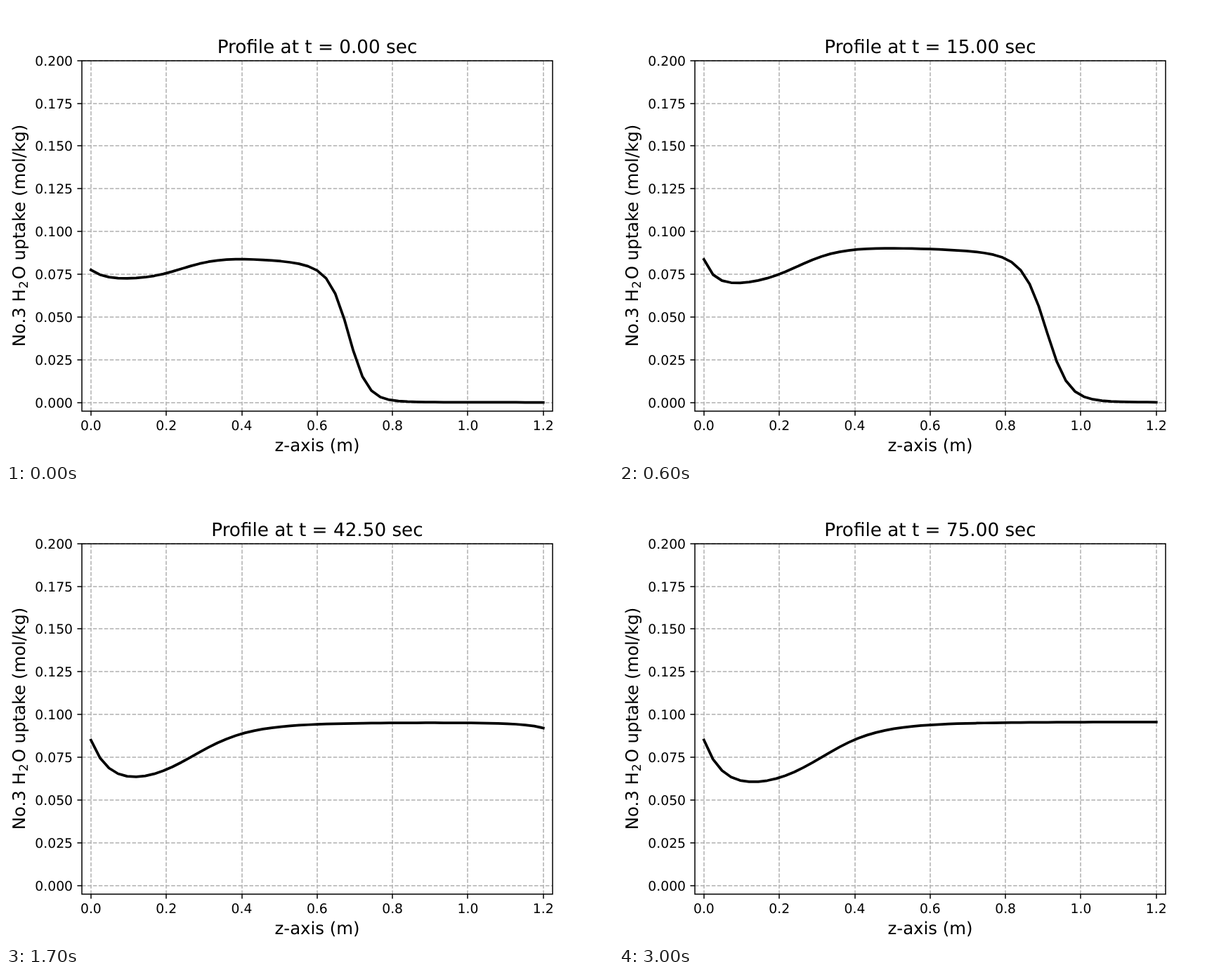
An HTML page for the animation above (3100 ms loop, 864x648 px).

```html
<!DOCTYPE html>
<html lang="en">
<head>
<meta charset="utf-8">
<title>Uptake profile</title>
<style>
  html, body { margin: 0; width: 100%; height: 100%; overflow: hidden; background: #fff; }
  svg { display: block; width: 864px; height: 648px; }
  text { font-family: "DejaVu Sans", sans-serif; font-size: 18.75px; text-rendering: geometricPrecision; }
  .mid { text-anchor: middle; }
  .end { text-anchor: end; }
  .label { font-size: 24.375px; }
  .title { font-size: 26.25px; }
  .grid { stroke: #b0b0b0; stroke-width: 1.5; stroke-dasharray: 5.55 2.4; }
  .axis { stroke: #000; stroke-width: 1.5; fill: none; }
  .curve { stroke: #000; stroke-width: 3.75; fill: none; stroke-linejoin: round; stroke-linecap: square; }
</style>
</head>
<body>
<svg viewBox="0 0 864 648">
  <g id="grid"></g>
  <path id="curve" class="curve"/>
  <g id="axes"><rect class="axis" x="108" y="78" width="670" height="499"/></g>
  <text id="title" class="mid title" x="443" y="67"></text>
  <text class="mid label" x="443" y="634">z-axis (m)</text>
  <text class="mid label" transform="translate(27 327) rotate(-90)">No.3 H<tspan font-size="17.06" dx="1" dy="4">2</tspan><tspan dx="2" dy="-4">O uptake (mol/kg)</tspan></text>
</svg>
<script>
const STEP = 100, STEPS = 31, CELLS = 50;
const $ = id => document.getElementById(id);
const px = z => 120.9 + z * 536.54;
const py = v => 564.55 - v * 2433.95;

// S-curve from 0 to 1 whose flanks ease out beyond the given reach
const rise = (d, slope, reach) => 1 / (1 + Math.exp(-slope * reach * Math.atan(d / reach)));

// Loading behind the front, in 1e-4 mol/kg: inlet decay, dip, rise to a plateau
function bedAt(step) {
  const early = Math.exp(-((step / 9.5) ** 3));
  const floor = 570 - step + 140 * early;
  const inlet = 851 - 75 * Math.exp(-step / 3.5);
  const reach = 2 - 1.1 * Math.exp(-(((step - 4) / 4) ** 2));
  const centre = 10.4 + 0.0029 * step * step;
  const slope = 0.3 + 0.15 * early * early;
  const plateau = 960 - 60 * Math.exp(-step / 4);
  const tilt = 3 * Math.exp(-((step / 8) ** 2));
  const base = i => floor + (plateau - tilt * i - floor) * rise(i - centre, slope, 14);
  return i => base(i) + (inlet - base(0)) * Math.exp(-i / reach);
}

// Share of the loading reached at distance d (px) ahead of the front
function frontShare(d) {
  const logit = 5.795 * (Math.atan((d - 15) / 95) + Math.atan(15 / 95));
  return 1 / (1 + Math.exp(logit));
}

function profile(step) {
  const bed = bedAt(step);
  const front = 487.1 + 19.76 * step + 0.037 * step * step;
  const sharp = 1 + 0.2 * Math.exp(-step / 2);
  let path = "";
  for (let i = 0; i <= CELLS; i++) {
    const x = px(i * 1.2 / CELLS);
    const v = bed(i) * 1e-4 * frontShare((x - front) * sharp);
    path += (i ? "L" : "M") + x.toFixed(2) + " " + py(v).toFixed(2);
  }
  return path;
}

function add(parent, tag, attrs, text = "") {
  const el = document.createElementNS("http://www.w3.org/2000/svg", tag);
  for (const name in attrs) el.setAttribute(name, attrs[name]);
  el.textContent = text;
  parent.appendChild(el);
}

function drawAxes() {
  for (let i = 0; i <= 6; i++) {
    const x = Math.round(px(i * 0.2));
    add($("grid"), "path", { class: "grid", d: `M${x} 577V78` });
    add($("axes"), "path", { class: "axis", d: `M${x} 577v6.56` });
    add($("axes"), "text", { class: "mid", x: px(i * 0.2), y: 604 }, (i * 0.2).toFixed(1));
  }
  for (let i = 0; i <= 8; i++) {
    const y = Math.round(py(i * 0.025));
    add($("grid"), "path", { class: "grid", d: `M108 ${y}H778` });
    add($("axes"), "path", { class: "axis", d: `M108 ${y}h-6.56` });
    add($("axes"), "text", { class: "end", x: 95, y: y + 7 }, (i * 0.025).toFixed(3));
  }
}

let shown = -1;
function draw() {
  const step = Math.floor(performance.now() / STEP) % STEPS;
  if (step !== shown) {
    shown = step;
    $("title").textContent = `Profile at t = ${(step * 2.5).toFixed(2)} sec`;
    $("curve").setAttribute("d", profile(step));
  }
  requestAnimationFrame(draw);
}

drawAxes();
draw();
</script>
</body>
</html>
```
